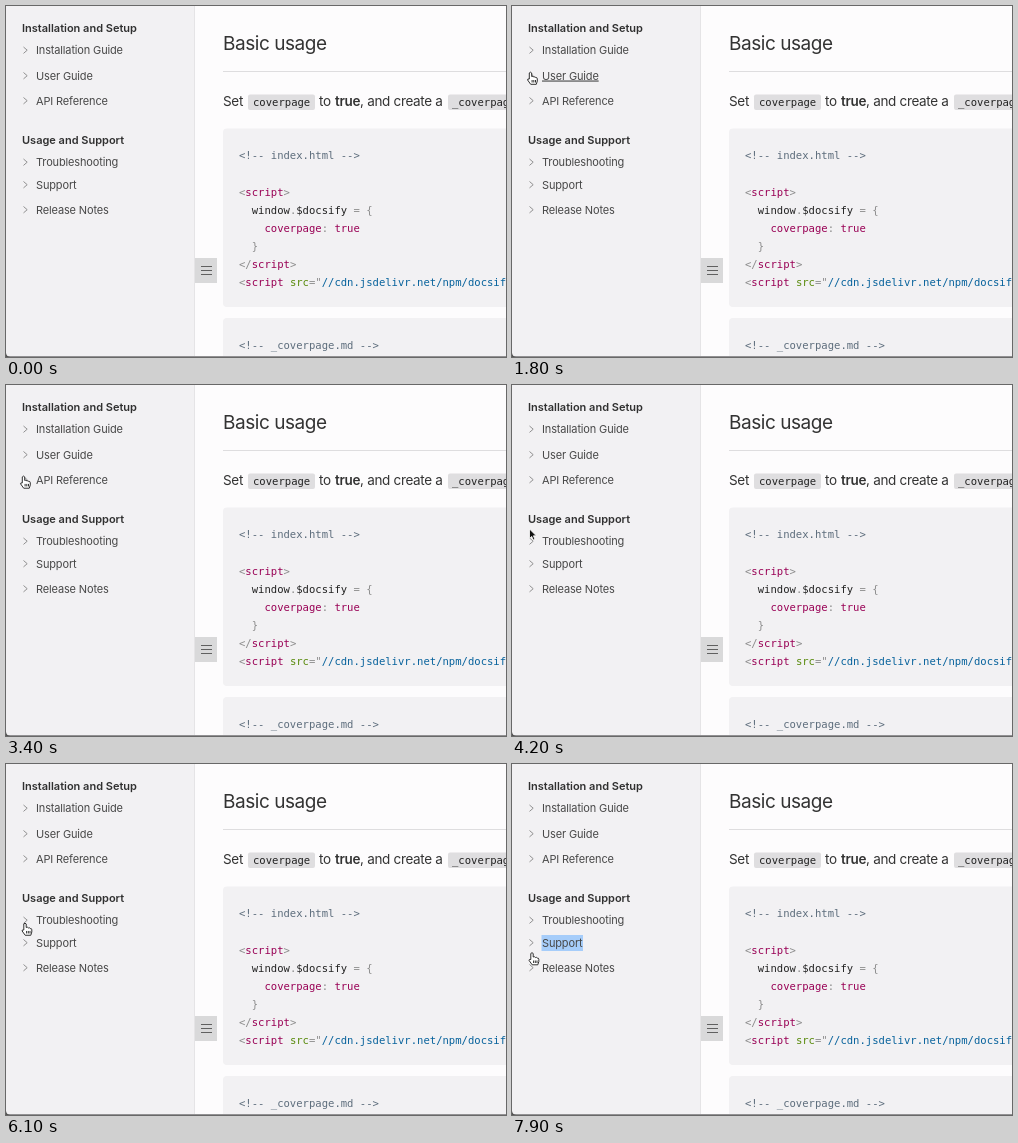
Animation of 500x351 px, one loop 8000 ms. Source, as an HTML page:

```html
<!DOCTYPE html>
<html lang="en">
<head>
<meta charset="utf-8">
<title>Sidebar demo</title>
<style>
html, body { margin: 0; width: 100%; height: 100%; overflow: hidden; background: #fdfcfd; }
svg { display: block; width: 500px; height: 351px; }
text { font-family: Inter, sans-serif; fill: #333; white-space: pre; }
.item { font-size: 11px; letter-spacing: -.15px; fill: #484848; }
.head { font-size: 11px; font-weight: 600; fill: #303030; }
.para { font-size: 13.5px; letter-spacing: -.32px; }
.code { font-family: "DejaVu Sans Mono", monospace; font-size: 10.57px; fill: #222; }
.tag { fill: #905; }
.dim { fill: #8c8c8c; }
.note { fill: #5d6d7c; }
.attr { fill: #598a0c; }
.str { fill: #07629c; }
.chevron { fill: none; stroke: #858585; stroke-width: .9; }
.hover { text-decoration: underline; text-decoration-thickness: .8px; text-underline-offset: 1.5px; }
</style>
</head>
<body>
<svg viewBox="0 0 500 351">
  <rect width="189" height="351" fill="#f2f1f3"/>
  <path d="M188.5 0V351" stroke="#e5e4e6"/>
  <text class="head" x="16" y="26">Installation and Setup</text>
  <text class="head" x="16" y="137.5">Usage and Support</text>
  <rect id="selection" x="29.5" y="171" width="41.5" height="16" fill="#a6cdfa"/>
  <g id="menu"></g>

  <rect x="189" y="252" width="22" height="25" fill="#d9d9da"/>
  <path d="M195 260.5h11M195 264.5h11M195 268.5h11" stroke="#606060"/>

  <text x="217" y="44" font-size="19" letter-spacing="-.45">Basic usage</text>
  <path d="M217 65.5H500" stroke="#dedddf"/>
  <rect x="242" y="88.5" width="67" height="15.5" rx="2" fill="#dfdee0"/>
  <rect x="442" y="88.5" width="60" height="15.5" rx="2" fill="#dfdee0"/>
  <g class="para">
    <text x="217" y="100">Set</text>
    <text x="313" y="100">to</text>
    <text x="329" y="100"><tspan font-weight="600">true</tspan>, and create a</text>
  </g>
  <text class="code" x="247" y="100">coverpage</text>
  <text class="code" x="446" y="100">_coverpage.md</text>

  <rect x="217" y="122.5" width="290" height="178.5" rx="4" fill="#f2f1f3"/>
  <rect x="217" y="312" width="290" height="50" rx="4" fill="#f2f1f3"/>
  <g id="code"></g>

  <g id="status">
    <path d="M0 336H177Q180 336 180 339V351H0Z" fill="#d8d7d9" stroke="#bfbec0" stroke-width=".7"/>
    <text x="2" y="347" font-size="8.7" letter-spacing="-.2">127.0.0.1:3000/docs/#/user-guide/overview</text>
  </g>
  <path d="M0 350.5H500" stroke="#929193"/>
  <path d="M0 347Q.5 350.5 4 351H0Z" fill="#555"/>

  <g id="cursor" stroke-linejoin="round">
    <path id="arrow" d="M0 0V9.4L2.2 7.4 3.8 11 5.4 10.3 3.9 6.8H6.8Z" fill="#111" stroke="#fff" stroke-width=".8"/>
    <path id="hand" d="M-1.2 1Q0-.6 1.2 1V4.5Q2.6 3.7 3.4 5Q4.6 4.4 5.3 5.6Q6.6 5.2 6.8 6.8V9L5.8 12.3H.2L-2.9 8Q-3.2 6.6-1.2 7ZM1.6 8V10.5M3.3 8V10.5M5 8V10.5" fill="#fff" stroke="#1a1a1a" stroke-width=".9"/>
  </g>
</svg>
<script>
const $ = id => document.getElementById(id);
const within = (t, [from, to]) => t >= from && t < to;

const codeLines = [
  [153, 'note:<!-- index.html -->'],
  [189.5, 'dim:<', 'tag:script', 'dim:>'],
  [208, ':  window', 'dim:.', ':$docsify ', 'dim:= {'],
  [226, 'tag:    coverpage', 'dim::', 'tag: true'],
  [244, 'dim:  }'],
  [262, 'dim:</', 'tag:script', 'dim:>'],
  [280, 'dim:<', 'tag:script ', 'attr:src', 'dim:="', 'str://cdn.jsdelivr.net/npm/docsify'],
  [343, 'note:<!-- _coverpage.md -->']
];
$('code').innerHTML = codeLines.map(([y, ...parts]) => {
  const spans = parts.map(part => {
    const cut = part.indexOf(':');
    return `<tspan class="${part.slice(0, cut)}">${part.slice(cut + 1).replace(/</g, '&lt;')}</tspan>`;
  });
  return `<text class="code" x="233" y="${y}">${spans.join('')}</text>`;
}).join('');

const OPEN = [4700, 5800];
const HOVER = {
  'Installation Guide': [800, 1500],
  'User Guide': [1600, 2200],
  'Release Notes': [6700, 7100]
};

function row(t, label, y, x = 30, shape = 'right') {
  const paths = { right: `M${x - 12.5} ${y - 7}l3.7 3.2-3.7 3.2`, down: `M${x - 14} ${y - 5.6}l3.7 3.5 3.7-3.5`, none: '' };
  const hover = within(t, HOVER[label] || [0, 0]) ? ' hover' : '';
  return `<path class="chevron" d="${paths[shape]}"/><text class="item${hover}" x="${x}" y="${y}">${label}</text>`;
}

function menu(t) {
  const open = within(t, OPEN), shift = open ? 50.4 : 0;
  return row(t, 'Installation Guide', 48) + row(t, 'User Guide', 73.5) + row(t, 'API Reference', 98.5)
    + row(t, 'Troubleshooting', 160, 30, open ? 'down' : 'right')
    + (open ? row(t, 'Common Issues', 182.5, 38.5) + row(t, 'Known Issues', 207.5, 38.5, 'none') : '')
    + row(t, 'Support', 182.5 + shift) + row(t, 'Release Notes', 207.5 + shift);
}

// time, x, y of the pointer tip
const track = [
  [0, -12, 60], [200, -12, 60], [800, 18, 41], [1400, 18, 41], [1800, 18.5, 66], [2100, 18.5, 66],
  [2400, 17.5, 87], [3500, 17.5, 91], [4200, 17.5, 144], [4500, 19, 153], [4900, 19, 153],
  [5300, 29.5, 177.5], [5700, 19, 153], [6000, 19, 153], [6300, 19, 176], [6600, 19, 176],
  [6900, 25.5, 189.5], [7300, 32, 176], [7500, 32, 176], [7900, 20, 188.5], [8000, 20, 188.5]
];
const ARROW = [[0, 700], [3600, 4400]];

function pointer(t) {
  const i = track.findIndex(k => k[0] > t);
  const [t0, x0, y0] = track[i - 1], [t1, x1, y1] = track[i];
  const p = (t - t0) / (t1 - t0), e = p * p * (3 - 2 * p);
  return [x0 + (x1 - x0) * e, y0 + (y1 - y0) * e];
}

const show = (id, on) => $(id).setAttribute('visibility', on ? 'visible' : 'hidden');
let last = -1;

function draw(now) {
  const t = Math.floor(now % 8000 / 100) * 100;
  if (t !== last) {
    last = t;
    const arrow = ARROW.some(span => within(t, span));
    $('menu').innerHTML = menu(t);
    $('cursor').setAttribute('transform', `translate(${pointer(t)})`);
    show('arrow', arrow);
    show('hand', !arrow);
    show('status', within(t, [2200, 3300]));
    show('selection', t >= 7500);
  }
  requestAnimationFrame(draw);
}
draw(0);
</script>
</body>
</html>
```
